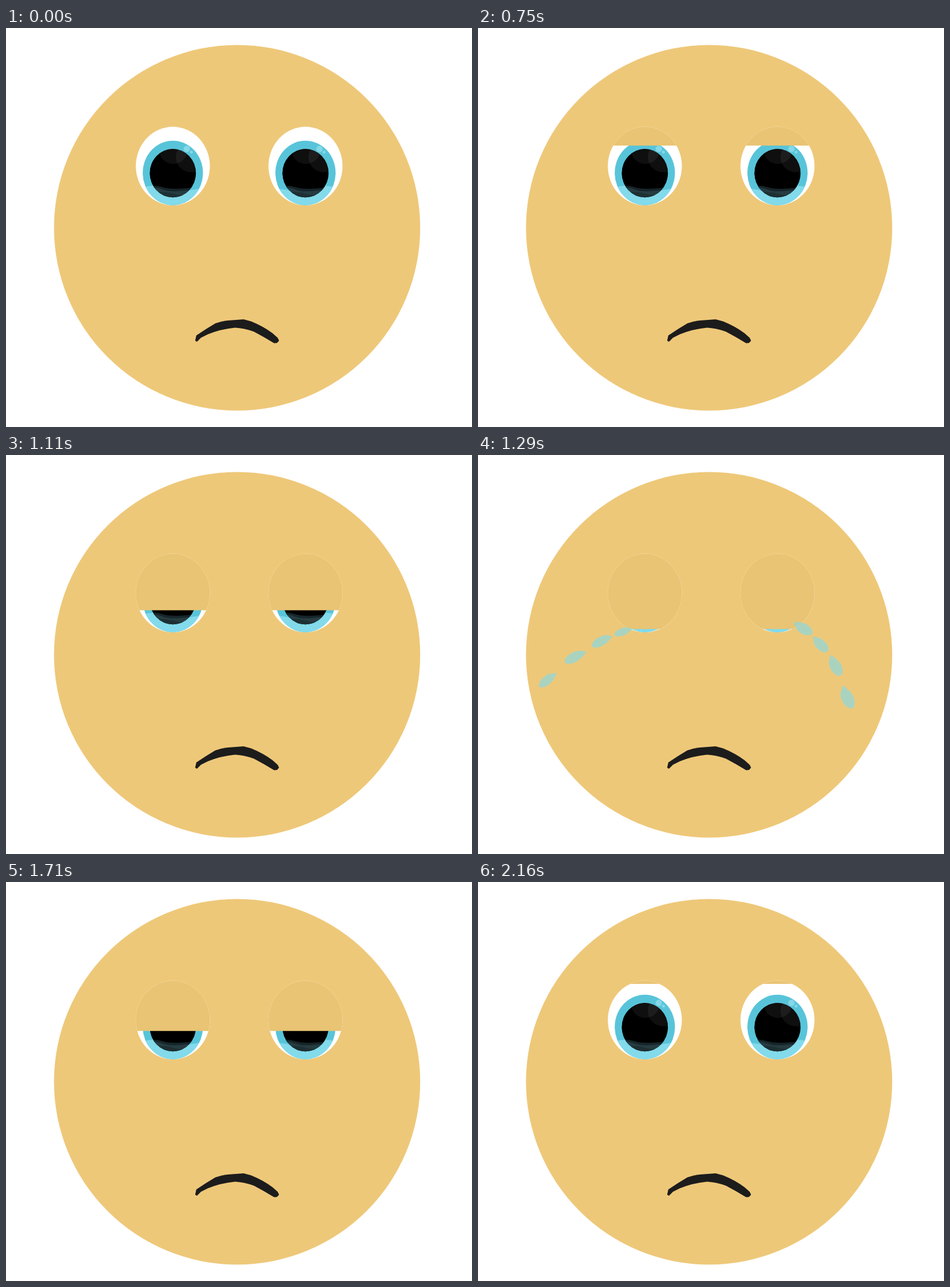
These frames come from a looping animation (808 px wide and 693 px high, 2.19 s). An HTML page:

```html
<!DOCTYPE html>
<html lang="en">
<head>
<meta charset="utf-8">
<title>Crying face</title>
<style>
  html, body { margin: 0; width: 100%; height: 100%; overflow: hidden; background: #fff; }
  svg { display: block; width: 808px; height: 693px; }
</style>
</head>
<body>
<svg viewBox="0 0 808 693">
  <defs>
    <clipPath id="ball"><ellipse cx="289.3" cy="239.8" rx="64.2" ry="68.2"/></clipPath>
    <clipPath id="iris"><ellipse cx="289.3" cy="251.7" rx="52.2" ry="56"/></clipPath>
    <clipPath id="pupil"><ellipse cx="289.3" cy="252" rx="40.2" ry="42.2"/></clipPath>
    <g id="eye">
      <ellipse cx="289.3" cy="239.8" rx="64.2" ry="68.2" fill="#fff"/>
      <ellipse cx="289.3" cy="251.7" rx="52.2" ry="56" fill="#58c4d9"/>
      <circle cx="313.5" cy="210" r="5.5" fill="#85d8e7"/>
      <circle cx="321.5" cy="215.5" r="2.5" fill="#85d8e7"/>
    </g>
    <g id="water">
      <g clip-path="url(#iris)">
        <path d="M235 278Q252 271 268 276T302 282T345 277V310H235Z" fill="#82daea"/>
      </g>
      <g clip-path="url(#pupil)">
        <ellipse cx="289.3" cy="252" rx="40.2" ry="42.2"/>
        <g fill="#fff" fill-opacity=".06">
          <circle cx="290" cy="211" r="25"/>
          <circle cx="321" cy="224" r="26.5"/>
        </g>
        <path d="M245 276Q258 272 270 276T302 279T335 277V300H245Z" fill="#162529"/>
        <path d="M245 279Q258 275 270 280T302 283T335 280V300H245Z" fill="#263c41"/>
        <path d="M245 287Q270 282 290 288T335 286V300H245Z" fill="#1d3034"/>
      </g>
    </g>
    <g id="lid" clip-path="url(#ball)">
      <rect class="lid" x="220" y="165" width="140" height="0" fill="#e8c474"/>
    </g>
  </defs>

  <circle cx="400.7" cy="347" r="317.5" fill="#eec879"/>
  <path fill="#1c1c1c" d="M328 543L330 534Q346 523 363 513Q374 509 385 508L412 506L425 509.5Q446 518 462 530L471 538L473.5 543L470 547L465 547.5Q448 537 430 527.5Q412 521 397 520.5Q372 523 350 532L338 538L331 545Z"/>
  <use href="#eye"/>
  <use href="#water"/>
  <use href="#lid"/>
  <g transform="translate(230)">
    <use href="#eye"/>
    <g id="rightWater"></g>
    <use href="#lid"/>
  </g>
  <g id="tears" fill="#82daea" fill-opacity=".62"></g>
</svg>
<script>
const LOOP = 2190, STEP = 30, CLOSE_AT = 600, HALF = 26;
const LID_TOP = 177, LID_SPEED = 5.45;
const TEARS_FROM = 22, TEARS_TO = 34, TEARS_POSE = 23;

const NS = 'http://www.w3.org/2000/svg';
const byId = id => document.getElementById(id);

function add(parent, tag, attrs = {}) {
  const el = document.createElementNS(NS, tag);
  for (const name in attrs) el.setAttribute(name, attrs[name]);
  return parent.appendChild(el);
}

// The iris water is mirrored in the right eye, the pupil is not.
const [surface, pupil] = byId('water').children;
const mirror = add(byId('rightWater'), 'g', { transform: 'translate(578.6) scale(-1 1)' });
mirror.append(surface.cloneNode(true));
byId('rightWater').append(pupil.cloneNode(true));

// Each drop runs from its pointed tail to its round head.
const streams = [
  { speed: [-6.5, 25], width: 0.82, drops: [
    [267, 300, 237, 313], [232, 312, 198, 333], [187, 339, 151, 361], [135, 377, 107, 403]] },
  { speed: [15, 25], width: 1, drops: [
    [546, 293, 580, 309], [579, 317, 607, 340], [608, 349, 630, 382], [629, 402, 650, 439]] }
];

for (const s of streams) {
  s.el = add(byId('tears'), 'g');
  for (const [x, y, hx, hy] of s.drops) {
    const size = Math.hypot(hx - x, hy - y) / 36;
    const angle = Math.atan2(hy - y, hx - x) * 180 / Math.PI;
    add(s.el, 'path', {
      d: 'M0 -3C10 -9 28 -13 36 -1C38 9 18 12 8 5Q4 1 0 -3Z',
      transform: `translate(${x} ${y}) rotate(${angle}) scale(${size} ${size * s.width})`
    });
  }
}

const lid = document.querySelector('.lid');

function draw(time) {
  const k = Math.floor((time % LOOP - CLOSE_AT) / STEP);
  const depth = HALF - Math.abs(k - HALF);
  lid.setAttribute('height', k < 0 ? 0 : LID_TOP + LID_SPEED * depth - 165);

  const crying = k >= TEARS_FROM && k < TEARS_TO + 1;
  byId('tears').setAttribute('visibility', crying ? 'visible' : 'hidden');
  for (const { el, speed: [vx, vy] } of streams) {
    const n = k - TEARS_POSE;
    el.setAttribute('transform', `translate(${vx * n} ${vy * n})`);
  }
}

const start = performance.now();
function tick() {
  draw(performance.now() - start);
  requestAnimationFrame(tick);
}
tick();
</script>
</body>
</html>
```
